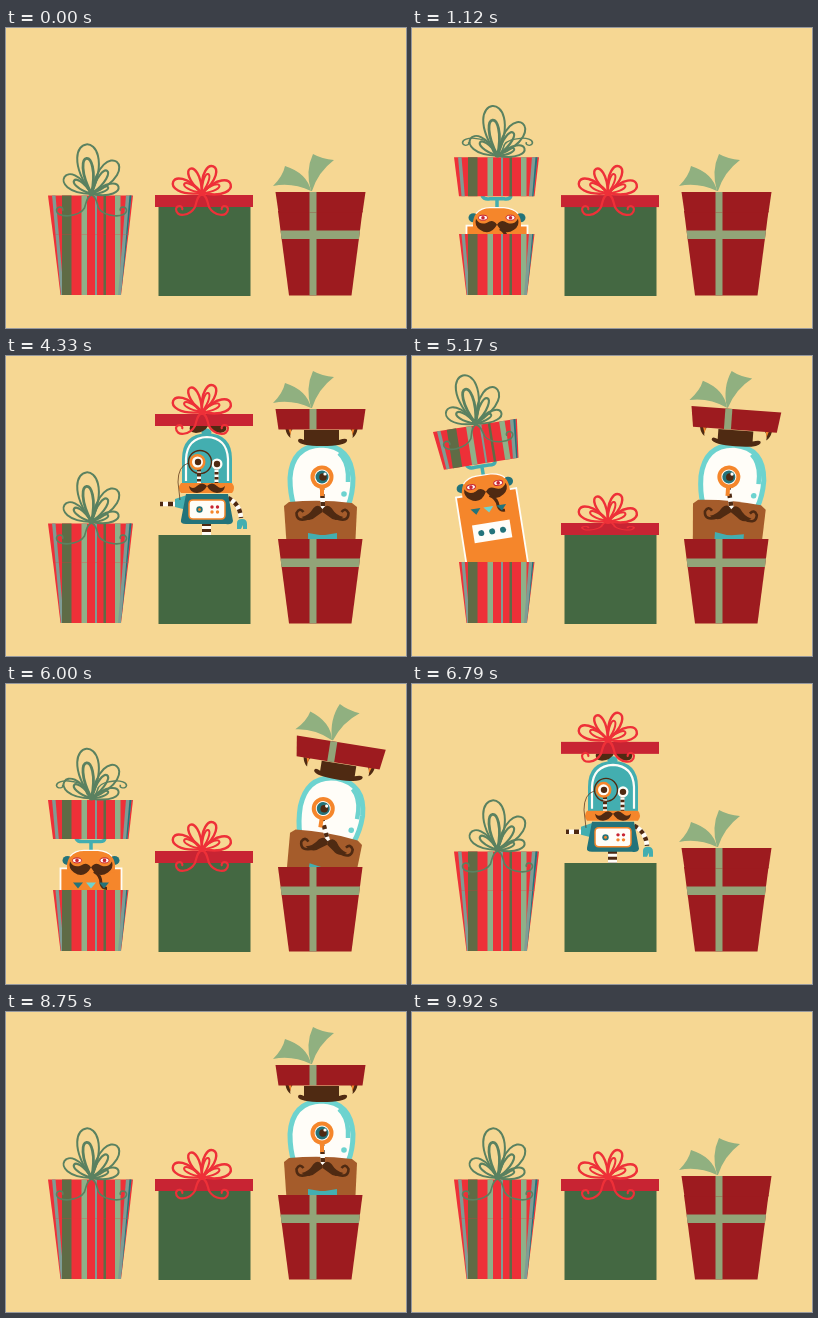
Write an HTML page with a canvas that moves like this. It is 400x300 px and loops after 9.96 s.

```html
<!DOCTYPE html>
<html lang="en">
<head>
<meta charset="utf-8">
<title>Robot presents</title>
<style>
html, body { margin: 0; width: 100%; height: 100%; overflow: hidden; background: #f6d793; }
canvas { display: block; }
</style>
</head>
<body>
<canvas id="stage" width="400" height="300"></canvas>
<script>
const ctx = document.getElementById('stage').getContext('2d');
const LOOP = 9960, RISE = 320, FALL = 345, WINDUP = 100, SETTLE = 220;
const C = {
  bg: '#f6d793', red: '#ee3038', lidRed: '#c82433', wine: '#9d1b1f', green: '#446842',
  sage: '#92a478', leaf: '#90b080', bow: '#5a8160', moss: '#5f6b45', mint: '#8fb088',
  teal: '#43aeb0', deep: '#23737a', aqua: '#6dd3cf', orange: '#f5862b', brown: '#4f2a12',
  tan: '#a55c2b', white: '#fffdf8', mist: '#7f9c94'
};

// ---- drawing helpers ----
function path(d, fill, stroke, width = 1) {
  const p = new Path2D(d);
  if (fill) { ctx.fillStyle = fill; ctx.fill(p); }
  if (stroke) { ctx.strokeStyle = stroke; ctx.lineWidth = width; ctx.stroke(p); }
}
function rect(x, y, w, h, fill) { ctx.fillStyle = fill; ctx.fillRect(x, y, w, h); }
function oval(x, y, rx, ry, fill, stroke, width = 1) {
  ctx.beginPath();
  ctx.ellipse(x, y, rx, ry, 0, 0, Math.PI * 2);
  if (fill) { ctx.fillStyle = fill; ctx.fill(); }
  if (stroke) { ctx.strokeStyle = stroke; ctx.lineWidth = width; ctx.stroke(); }
}
function striped(d, width, dash) {
  path(d, null, C.white, width);
  ctx.setLineDash([dash, dash]);
  path(d, null, C.brown, width);
  ctx.setLineDash([]);
}
function group(x, y, degrees, draw) {
  ctx.save();
  ctx.translate(x, y);
  ctx.rotate(degrees * Math.PI / 180);
  draw();
  ctx.restore();
}
function shifted(y, draw) { group(0, y, 0, draw); }
function leaning(x, y, angle, draw) {
  group(x, y, angle, () => { ctx.translate(-x, -y); draw(); });
}
function mirrored(x, draw) {
  for (const side of [1, -1]) {
    ctx.save();
    ctx.translate(x, 0);
    ctx.scale(side, 1);
    draw();
    ctx.restore();
  }
}
function clipped(top, draw) {
  ctx.save();
  ctx.beginPath();
  ctx.rect(0, -50, 400, top + 58);
  ctx.clip();
  draw();
  ctx.restore();
}

// ---- timing helpers ----
const clamp = v => Math.max(0, Math.min(1, v));
const smooth = v => v * v * (3 - 2 * v);
function keyed(t, keys) {
  if (t <= keys[0][0]) return keys[0][1];
  for (let i = 1; i < keys.length; i++) {
    const [t0, a] = keys[i - 1], [t1, b] = keys[i];
    if (t < t1) return a + (b - a) * smooth((t - t0) / (t1 - t0));
  }
  return keys[keys.length - 1][1];
}
function backOut(p) {
  const q = p - 1;
  return 1 + 2.7 * q * q * q + 1.7 * q * q;
}
// Lift of the lid, and how far loose parts are thrown upward by the drop.
// A lid dips a little just before it springs up.
function popState(t, pops, height) {
  for (const [up, down] of pops) {
    if (t < up - WINDUP || t > down + FALL + SETTLE) continue;
    if (t < up) return { lift: -3 * Math.sin((up - t) / WINDUP * Math.PI), fling: 0 };
    const p = clamp((t - down) / FALL);
    const lift = t < down ? backOut(clamp((t - up) / RISE)) : 1 - p * p;
    const settle = smooth(clamp((t - down - FALL) / SETTLE));
    return { lift: lift * height, fling: clamp(p * 2) * (1 - settle) };
  }
  return { lift: 0, fling: 0 };
}

// ---- bows ----
function loops(list, color) {
  ctx.strokeStyle = color;
  for (const [angle, length, spread, width] of list) {
    group(0, 0, angle, () => {
      ctx.beginPath();
      ctx.moveTo(0, 0);
      ctx.bezierCurveTo(length * 1.33, spread, length * 1.33, -spread, 0, 0);
      ctx.lineWidth = width;
      ctx.stroke();
    });
  }
}
function tails(color, reach, fling, width) {
  ctx.save();
  ctx.scale(1, 1 - 1.8 * fling);
  mirrored(0, () => path(
    `M0 1C5 3 5 8 7 14C12 23 ${reach} 25 ${reach} 16C${reach - 1} 11 ${reach - 8} 13 ${reach - 6} 17`,
    null, color, width));
  ctx.restore();
}
function greenBow(fling) {
  group(85.5, 166, 0, () => {
    loops([[-96, 50, 37, 2], [-52, 41, 30, 2], [-148, 32, 25, 2], [-15, 28, 18, 2],
      [-98, 36, 17, 2.8], [-56, 28, 13, 2.2], [-142, 22, 11, 2.2], [-22, 18, 8, 2]], C.bow);
    tails(C.bow, 35, fling, 1.6);
    oval(0, -1, 3, 3, C.bow);
  });
}
function redBow(fling) {
  group(196, 165, 0, () => {
    loops([[-159, 31, 22, 2.4], [-116, 27, 16, 2.4], [-67, 29, 20, 2.4], [-17, 30, 22, 2.4],
      [-153, 20, 9, 2], [-72, 20, 9, 2], [-24, 19, 9, 2]], C.red);
    tails(C.red, 26, fling, 2.2);
    oval(0, 0, 4, 3, C.red);
  });
}
function leafBow() {
  path('M267 158Q277 148 279 138Q301 145 305 163Q286 154 267 158Z', C.leaf);
  path('M305 163Q299 143 307 126Q316 131 328 132Q312 144 306 163Z', C.leaf);
}

// ---- presents ----
function stripes(shape) {
  ctx.save();
  ctx.clip(new Path2D(shape));
  rect(40, 160, 90, 110, C.red);
  path('M46 167H49.5L58 268H55Z', C.mist);
  rect(56, 160, 9.5, 110, C.moss);
  rect(75.5, 160, 5.5, 110, C.mint);
  rect(89, 160, 2, 110, C.mist);
  rect(97.5, 160, 2.5, 110, C.moss);
  rect(109, 160, 5.5, 110, C.mint);
  path('M120 167H125.5L115 268H112Z', C.mist);
  path('M123.5 167H125.5L115 268Z', C.deep);
  ctx.restore();
}
function wineBox() {
  path('M272 183H356.5L345.5 267.5H283Z', C.wine);
  rect(303.5, 183, 7, 84.5, C.sage);
  path('M274.5 202.5H354L353 211H275.5Z', C.sage);
}
function wineLid() {
  path('M269.5 164H359.5L356.5 184.5H272.5Z', C.wine);
  rect(303.5, 164, 7, 20.5, C.sage);
  leafBow();
}

// ---- robots, each drawn in its raised pose ----
function orangeRobot() {
  path('M70 154Q72 158 78 157H92Q98 158 99 154M85 156V168', null, C.teal, 3.5);
  path('M54.5 260V184H62V180H108V184H115.5V260Z', C.orange, C.white, 1.8);
  oval(61.5, 176, 5, 4.5, C.deep);
  oval(108.5, 176, 5, 4.5, C.deep);
  path('M61 188V180Q63 166 78 166H92Q107 167 109 180V188Z', C.orange);
  path('M64 172Q69 166 78 166H92Q102 167 106 172', null, C.white, 1.2);
  for (const x of [71, 98.5]) {
    oval(x, 176, 4.5, 2.5, C.white, C.lidRed, 1);
    oval(x, 176, 1.8, 1.8, C.lidRed);
  }
  mirrored(85, () => path('M0 183Q4 177 10 181Q17 184 21 177Q23 184 17 188Q7 195 0 183Z', C.brown));
  path('M88 187Q95 191 95 199Q96 204 101 204', null, C.brown, 3);
  [C.deep, C.aqua, C.deep].forEach((color, i) =>
    path(`M${67 + 13 * i} 198h10l-5 6Z`, color));
  rect(66, 214, 38, 18, C.white);
  for (const x of [74, 85, 96]) oval(x, 223, 3, 3, C.deep);
}

function tealRobot(fling, tilt) {
  const eyeY = 106 - 10 * fling;
  striped('M200.5 167V240', 9, 3);
  striped('M177 148H154', 4.5, 5);
  striped('M222 142Q234 148 235 162', 4.5, 4);
  path('M231 173V167Q231 163 236 163Q241 163 241 168V173H237V169L235 173Z', C.teal);
  path('M169 143L181 139V154L169 151Z', C.teal);
  path('M180 138H222L227 165Q226 169 220 168H180Q174 168 175 164Z', C.deep);
  oval(200.5, 76.5, 5, 4, C.teal);
  path('M176 130V103Q176 78 201 77Q226 78 226 103V130Z', C.teal);
  path('M180 125V103Q181 82 201 81Q221 82 222 103V125', null, C.white, 2.2);
  striped(`M193 ${eyeY + 7}V128`, 4, 2.5);
  striped(`M210.5 ${eyeY + 5}V128`, 4, 2.5);
  oval(191.5, eyeY, 8, 8, C.orange);
  oval(191.5, eyeY, 5.5, 5.5, C.white);
  oval(192, eyeY, 3.2, 3.2, C.brown);
  oval(211, eyeY + 2, 5.5, 5.5, C.white);
  oval(211, eyeY + 2, 3.2, 3.2, C.brown);
  path('M175 127H226Q230 132 226 137H175Q171 132 175 127Z', C.orange);
  mirrored(201, () => path('M0 130Q5 125 10 130Q14 134 18 130Q17 137 10 137Q3 136 0 130Z', C.brown));
  path('M187 144H215Q219 144 219 148V159Q219 163 215 163H187Q183 163 183 159V148Q183 144 187 144Z',
    C.white, C.orange, 1.5);
  oval(193.5, 153.5, 3.2, 3.2, C.deep);
  oval(193.5, 153.5, 1.5, 1.5, C.orange);
  for (const x of [206, 211.5]) {
    oval(x, 151, 1.7, 1.7, C.lidRed);
    oval(x, 156, 1.7, 1.7, C.orange);
  }
  const mx = 194 - 22 * fling - 9 * tilt, my = 106 - 41 * fling - 8 * tilt;
  oval(mx, my, 11.5, 11.5, null, C.brown, 1.4);
  path(`M${mx - 11.5} ${my + 1}Q172 ${my + 4} 172 ${my + 20}L174 144`, null, C.brown, 0.7);
}

function domeRobot(lean) {
  const look = -lean;
  path('M288 150Q284 138 284 122Q286 90 315.5 89Q345 90 347 122Q347 138 342 150Z', C.white, C.aqua, 5);
  path('M333 97Q341 104 342 118V126', null, C.aqua, 4.5);
  oval(338, 138, 2.8, 2.8, C.aqua);
  path('M278 150L283 146Q315 143 346 147L351 151L349 194H281Z', C.tan);
  striped(`M${316 + look} 130L317 153`, 4.5, 4);
  path(`M${316 + look} 130V140`, null, C.orange, 4);
  oval(316 + look, 121, 11.5, 11.5, C.orange);
  oval(316 + look, 121, 7.5, 7.5, C.white);
  oval(316 + look, 121, 6.5, 6.5, C.deep);
  oval(317 + look, 121, 3.8, 3.8, C.brown);
  oval(319 + look, 118, 1.6, 1.6, C.white);
  mirrored(316.5, () => {
    path('M0 153Q4 147 9 152Q14 160 21 161Q13 167 7 161L0 156Z', C.brown);
    path('M13 162Q26 167 26 157Q23 151 19 156', null, C.brown, 2.6);
  });
  path('M302 177L314 179H319L331 177V186L319 184H314L302 186Z', C.teal);
  path('M298 84V74H333V84Q342 81 341 85Q339 90 316 90Q294 90 292 85Q292 81 298 84Z', C.brown);
}

// ---- scenes ----
function stripedPresent(t) {
  const { lift, fling } = popState(t, [[220, 850], [4660, 5761]], 100);
  const lean = keyed(t, [[4800, 0], [5000, -3], [5280, -12], [5500, -10], [5800, 0]]);
  clipped(206, () => leaning(85, 206, lean, () => shifted(52 - lift, orangeRobot)));
  stripes('M47 206H122.5L115 267H54.5Z');
  leaning(85, 206, lean, () => shifted(-lift, () => {
    stripes('M42 167.5H127L122.5 206.5H47Z');
    greenBow(fling);
  }));
}

function greenPresent(t) {
  const { lift, fling } = popState(t, [[1220, 2330], [3700, 4690], [6480, 8200]], 109);
  const tilt = keyed(t, [[1550, 0], [1750, 1], [2100, 0], [6900, 0], [7150, -0.5],
    [7450, 1], [7800, 1], [8150, 0]]);
  clipped(179, () => shifted(109 - lift, () => tealRobot(fling, tilt)));
  rect(152.5, 179, 92, 89, C.green);
  shifted(-lift, () => leaning(196, 174 - 2 * tilt, -13 * tilt, () => {
    if (lift > 9) {
      mirrored(202, () => path('M0 179Q7 176 18 179Q20 185 12 186Q3 185 0 179Z', C.brown));
    }
    rect(149, 167, 98, 12, C.lidRed);
    redBow(fling);
  }));
}

function winePresent(t) {
  const { lift } = popState(t, [[3340, 5935], [7800, 9255]], 111);
  const lean = keyed(t, [[3500, 0], [3760, 15], [4030, 0], [5050, 0], [5400, 15],
    [5650, 14], [5940, 9], [6010, 9], [6230, 0], [8200, 0], [8400, 3], [8650, 0]]);
  clipped(183, () => leaning(315, 190, lean, () => shifted(111 - lift, () => domeRobot(lean))));
  wineBox();
  leaning(315, 190, lean, () => shifted(-lift, () => {
    if (lift > 12) {
      mirrored(315.5, () => {
        path('M29 184H36Q35 190 31 193Q32 188 29 184Z', C.brown);
        path('M30 184H33L31 190Z', C.orange);
      });
    }
    wineLid();
  }));
}

function frame() {
  const t = performance.now() % LOOP;
  rect(0, 0, 400, 300, C.bg);
  stripedPresent(t);
  greenPresent(t);
  winePresent(t);
  requestAnimationFrame(frame);
}
frame();
</script>
</body>
</html>
```
